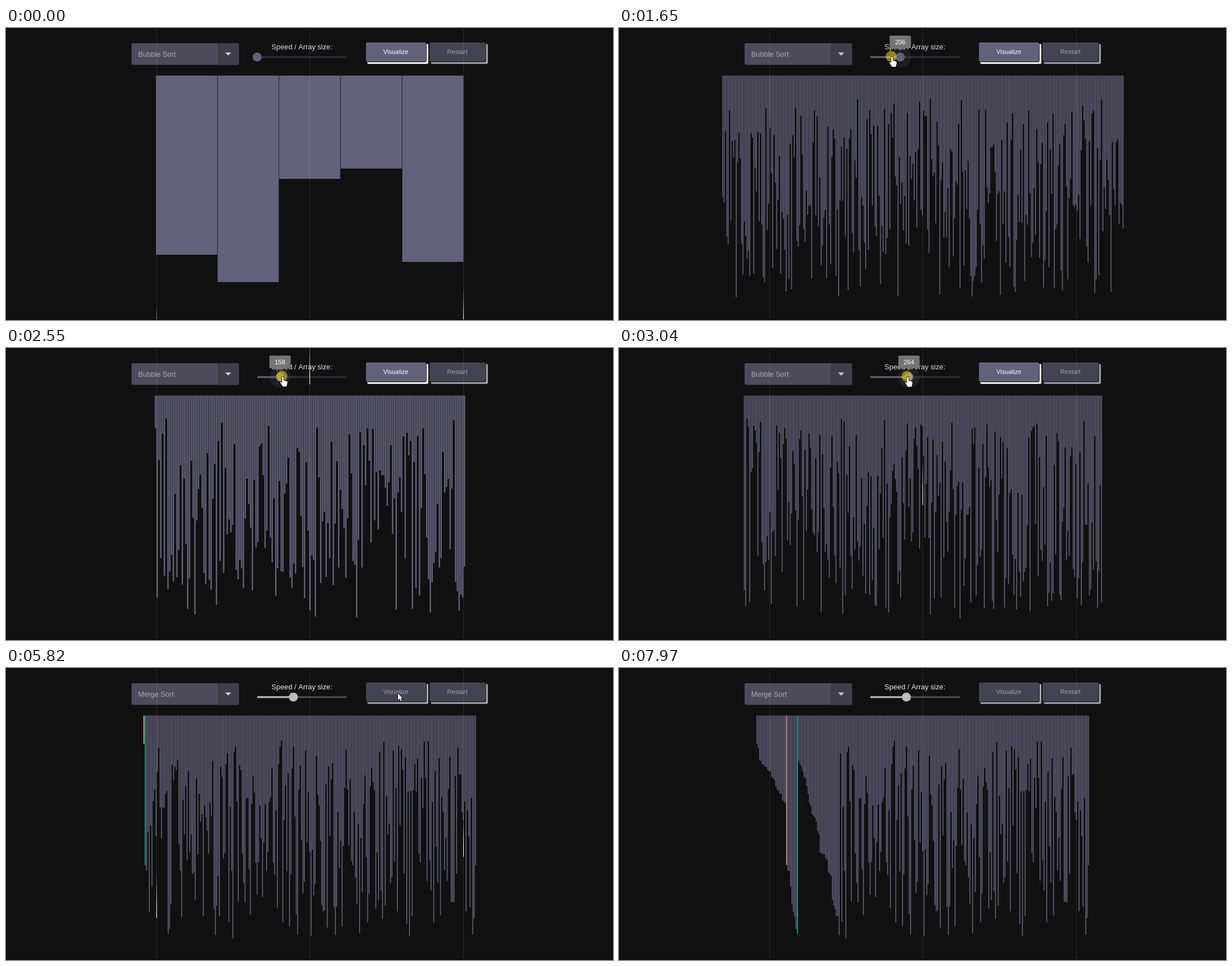
Write an HTML page with a canvas that moves like this. It is 1078x519 px and loops after 8000 ms.

```html
<!DOCTYPE html>
<html lang="en">
<head>
<meta charset="utf-8">
<title>Sorting visualizer</title>
<style>
html, body { margin: 0; width: 100%; height: 100%; overflow: hidden; background: #111; }
canvas { display: block; }
</style>
</head>
<body>
<canvas id="stage" width="1078" height="519"></canvas>
<script>
const ctx = document.getElementById('stage').getContext('2d');
const W = 1078, H = 519, LOOP = 8000, TICK = 69.17;
const PAGE_W = 1351, SCALE = W / PAGE_W;   // bars and buttons are laid out in page pixels
const FONT = '"Liberation Sans", Arial, sans-serif';
const PURPLE = '#64617a', BG = '#111';
const RAIL_X = 446, RAIL_Y = 51.7, RAIL_W = 159.5;
const SORT_START = 5800, SORT_END = 7944;
const ALGORITHMS = ['Bubble Sort', 'Quick Sort', 'Merge Sort', 'Heap Sort', 'Selection Sort'];
const FIRST = [403, 452, 268, 250, 416];

// Pointer path: time, x, y. Its x also drives the slider.
const PATH = [
  [60, 985, 260], [500, 446, 50.5], [668, 446, 50.5], [1118, 548, 50.5], [1415, 548, 50],
  [1585, 483, 50], [2279, 500, 50], [2451, 486, 49.5], [2870, 515.4, 50], [3100, 510.4, 50],
  [3340, 510.4, 50], [3650, 394, 48], [3760, 394, 48], [4050, 339, 98],
  [5100, 339, 98], [5500, 696, 45], [5880, 696, 45], [6600, 715, 540]];

const clamp = (v, lo, hi) => Math.min(hi, Math.max(lo, v));

function pointer(t) {
  t = clamp(t, PATH[0][0], PATH[PATH.length - 1][0]);
  const i = Math.max(1, PATH.findIndex(p => p[0] >= t));
  const [t0, x0, y0] = PATH[i - 1], [t1, x1, y1] = PATH[i];
  const u = (t - t0) / (t1 - t0), e = u * u * (3 - 2 * u);
  return [x0 + (x1 - x0) * e, y0 + (y1 - y0) * e];
}

// The slider trails the pointer while it is dragged.
const dragX = (t, lag) => pointer(clamp(t - lag, 500, 3300))[0];
const sizeAt = (t, lag) => Math.round(5 + (dragX(t, lag) - RAIL_X) * 600 / RAIL_W);

function random(seed) {
  return () => {
    seed = (seed + 0x6D2B79F5) | 0;
    let x = Math.imul(seed ^ seed >>> 15, 1 | seed);
    x = x + Math.imul(x ^ x >>> 7, 61 | x) ^ x;
    return ((x ^ x >>> 14) >>> 0) / 4294967296;
  };
}

const arrays = { 5: FIRST };
function makeArray(n) {
  if (!arrays[n]) {
    const next = random(n);
    arrays[n] = Array.from({ length: n }, () => 125 + next() * 357);
  }
  return arrays[n];
}

function* mergeSort(a, lo, hi) {
  if (lo >= hi) return;
  const mid = (lo + hi) >> 1;
  yield* mergeSort(a, lo, mid);
  yield* mergeSort(a, mid + 1, hi);
  const merged = a.slice(lo, hi + 1).sort((p, q) => p - q);
  if (merged.length === 2) {
    [a[lo], a[hi]] = merged;
    yield [lo, hi];
    return;
  }
  for (let k = lo; k <= hi; k++) {
    yield [k, Math.min(hi, Math.max(mid, k + 1))];
    a[k] = merged[k - lo];
  }
}

const steps = [];
const work = makeArray(sizeAt(LOOP, 0)).slice();
for (const [k, other] of mergeSort(work, 0, work.length - 1)) {
  steps.push({ bars: work.slice(), k, other });
  if (k === 22 && other === 30) break;
}

function box(x, y, w, h, r, fill) {
  ctx.fillStyle = fill;
  ctx.beginPath();
  ctx.roundRect(x, y, w, h, r);
  ctx.fill();
}

function disc(x, y, r, fill) {
  ctx.fillStyle = fill;
  ctx.beginPath();
  ctx.arc(x, y, r, 0, Math.PI * 2);
  ctx.fill();
}

function text(str, x, y, size, fill, align = 'left') {
  ctx.font = size + 'px ' + FONT;
  ctx.textAlign = align;
  ctx.fillStyle = fill;
  ctx.fillText(str, x, y);
}

function drawBars(t) {
  const u = clamp((t - SORT_START) / (SORT_END - SORT_START), 0, 1);
  const step = t >= SORT_START ? steps[Math.round(u * (steps.length - 1))] : null;
  const bars = step ? step.bars : makeArray(sizeAt(t, 165));
  const pitch = Math.ceil(684 / bars.length), top = 106;
  const left = Math.round((PAGE_W - bars.length * pitch) / 2) + 1;
  ctx.save();
  ctx.scale(SCALE, SCALE);
  bars.forEach((bottom, i) => {
    ctx.fillStyle = step && i === step.k ? '#ffa088' : step && i === step.other ? '#12bd98' : PURPLE;
    ctx.fillRect(left + i * pitch, top, pitch - 1, Math.round(bottom / SCALE) - top);
  });
  ctx.restore();
}

function drawSelect(name) {
  box(223, 27, 191, 38.5, 3, '#4e4b5d');
  box(376, 27, 38, 38.5, [0, 3, 3, 0], '#403e4b');
  ctx.fillStyle = '#ccc';
  ctx.beginPath();
  ctx.moveTo(389, 43.5);
  ctx.lineTo(400, 43.5);
  ctx.lineTo(394.5, 49);
  ctx.fill();
  text(name, 234.8, 51, 12.77, '#a9a8ad');
}

function drawSlider(x, sorting) {
  text('Speed / Array size:', 525.5, 38.3, 12.77, sorting ? '#e8e8e8' : '#dcdcdc', 'center');
  box(RAIL_X, 50.2, RAIL_W, 3, 1.5, sorting ? '#505050' : '#312f38');
  box(RAIL_X, 50.2, x - RAIL_X, 3, 1.5, sorting ? '#bdbdbd' : PURPLE);
}

function drawButton(label, x, w, disabled) {
  const y = 31, h = 45;
  ctx.save();
  ctx.scale(SCALE, SCALE);
  box(x + 4, y + 4, w, h, 4, disabled ? '#a5a5a5' : '#fff');
  box(x, y, w, h, 4, '#060606');
  box(x + 1, y + 1, w - 2, h - 2, 3, disabled ? '#444352' : PURPLE);
  text(label, x + w / 2 - 0.5, 57.5, 14, disabled ? '#a5a5a5' : '#fff', 'center');
  ctx.restore();
}

// cubic-bezier(.4, .26, 0, .97)
function drop(x) {
  const curve = (s, p, q) => 3 * (1 - s) * (1 - s) * s * p + 3 * (1 - s) * s * s * q + s * s * s;
  let lo = 0, hi = 1;
  for (let i = 0; i < 24; i++) {
    const mid = (lo + hi) / 2;
    if (curve(mid, 0.4, 0) < x) lo = mid; else hi = mid;
  }
  return curve(lo, 0.26, 0.97);
}

function drawLines(t) {
  const lag = 97 * clamp((t - 3700) / 2000, 0, 1);
  [[267, 3182], [539, 1182], [812, 3682]].forEach(([x, start]) => {
    ctx.fillStyle = 'rgba(255,255,255,.1)';
    ctx.fillRect(x, 0, 1, H);
    const age = (t - lag - start + 14000) % 7000;
    const y = H * (-0.5 + 1.6 * drop(age / 7000)), len = H * 0.15;
    const g = ctx.createLinearGradient(0, y, 0, y + len);
    g.addColorStop(0, 'rgba(255,255,255,0)');
    g.addColorStop(0.75, '#fff');
    ctx.fillStyle = g;
    ctx.fillRect(x, y, 1, len);
  });
}

function drawThumb(x, t, sorting) {
  const active = t > 560 && t < 3330;
  if (active) disc(x, RAIL_Y, t < 950 ? 15 : 19, 'rgba(100,97,122,.17)');
  disc(x, RAIL_Y, 8, sorting ? '#bdbdbd' : PURPLE);
  if (!active) return;
  const label = String(sizeAt(t, 121));
  const w = 18.6 + label.length * 6.4;
  ctx.fillStyle = '#757575';
  ctx.beginPath();
  ctx.moveTo(x - 5, 35);
  ctx.lineTo(x + 5, 35);
  ctx.lineTo(x, 40);
  ctx.fill();
  box(x - w / 2, 13.5, w, 22.5, 2, '#757575');
  text(label, x, 28.8, 11.2, '#fff', 'center');
}

function drawMenu(y) {
  const row = 16.2, pick = clamp(Math.floor((y - 65) / row), 0, 4);
  box(222.5, 65.5, 191.5, 82, 0, '#858296');
  box(223.5, 66.5, 189.5, 80, 0, PURPLE);
  box(223.5, 65.4 + pick * row, 189.5, row + 0.6, 0, '#1967d2');
  ALGORITHMS.forEach((name, i) => text(name, 236, 77.2 + i * row, 12.77, '#e4e4e8'));
}

function drawCursor(t, x, y) {
  const onSlider = t < 3400 && x > 430 && x < 620 && y < 70;
  const onButton = t > 5200 && t < 5700 && x > 638;
  const pressed = t > 660 && t < 3300 || t > 5560 && t < 5680;
  if (pressed) disc(x, y + 0.5, 9.7, 'rgba(255,244,0,.5)');
  ctx.save();
  ctx.translate(x, y);
  const shape = new Path2D(onSlider || onButton
    ? 'M0 3Q0 1 1.5 1T3 3V8L8.5 9.5Q10 10 9.8 12L9 15.5 8 19H1.5L-2.5 13Q-3.8 10.6-2 10.6L0 12Z'
    : 'M0 0V12L2.8 9.4 4.7 13.8 6.7 12.9 4.8 8.7H8.5Z');
  ctx.lineWidth = 1.6;
  ctx.lineJoin = 'round';
  ctx.strokeStyle = '#000';
  ctx.stroke(shape);
  ctx.fillStyle = '#fff';
  ctx.fill(shape);
  ctx.restore();
}

function draw(time) {
  const t = Math.max(0, Math.floor((time + 12) / TICK) * TICK - 10);
  const sorting = t > 5700;
  const thumb = t < 950 ? RAIL_X : dragX(t, 121);
  const [cx, cy] = pointer(t);

  ctx.fillStyle = BG;
  ctx.fillRect(0, 0, W, H);
  drawBars(t);
  drawSelect(t < 5080 ? ALGORITHMS[0] : ALGORITHMS[2]);
  drawSlider(thumb, sorting);
  drawButton('Visualize', 800, 136, sorting);
  drawButton('Restart', 941.5, 127, true);
  drawLines(t);
  drawThumb(thumb, t, sorting);
  ctx.fillStyle = '#060606';
  ctx.fillRect(0, H - 1, W, 1);
  if (t > 3720 && t < 5080) drawMenu(cy);
  if (t > 50 && t < 6600) drawCursor(t, cx, cy);
}

const began = performance.now();
function frame() {
  draw((performance.now() - began) % LOOP);
  requestAnimationFrame(frame);
}
frame();
</script>
</body>
</html>
```
